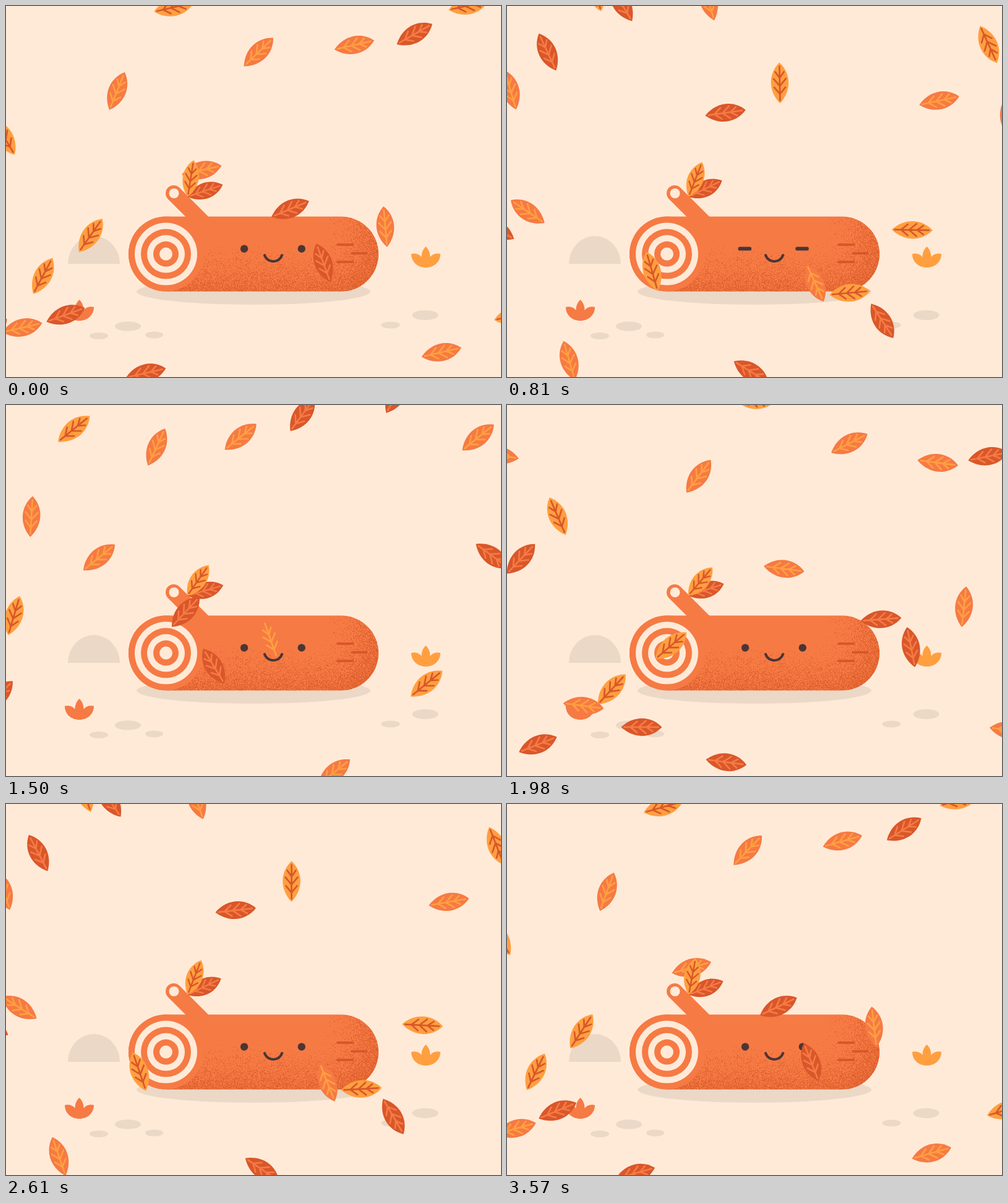
Write an HTML page with a canvas that moves like this. It is 800 px wide and 600 px high and loops after 3600 ms.

```html
<!DOCTYPE html>
<html lang="en">
<head>
<meta charset="utf-8">
<title>Autumn log</title>
<style>
  html, body { margin: 0; width: 100%; height: 100%; overflow: hidden; background: #ffead8; }
  canvas { display: block; }
</style>
</head>
<body>
<canvas id="stage" width="800" height="600"></canvas>
<script>
const LOOP = 3600, TAU = Math.PI * 2;
const CREAM = '#ffead8', SHADE = '#ebd8c6', ORANGE = '#f67a44', YELLOW = '#ff9f40', RUST = '#d9572a', INK = '#4a3634';
const stage = document.getElementById('stage').getContext('2d');

const leafShape = new Path2D('M0-33C19-15 19 13 0 33C-19 13-19-15 0-33Z');
const leafVeins = new Path2D('M0-27V28M-7-18L0-8L7-18M-10-7L0 5L10-7M-9 7L0 18L9 7');
const leafColors = { Y: [YELLOW, RUST], O: [ORANGE, YELLOW], D: [RUST, ORANGE] };

// Each leaf: colour, time at mid-path (ms), height of the bend, angle at time 0, degrees per ms
const dipping = [
  ['D', -335, 13, 60, .0885], ['O', -185, 51, 77, .097], ['O', 411, 110, 22, .069],
  ['Y', 800, 124, -31, .037], ['O', -786, -12, 77, .097], ['Y', -487, -60, 77, .097],
  ['Y', 264, -8, 77, .097], ['D', -37, 327, 67, .09], ['O', 718, 444, 77, .097],
  ['D', 938, 171, 30, .064], ['Y', -637, 413, 77, .097], ['D', 336, 576, 77, .097]
];
const arching = [
  ['O', 39, 75, 46, .079], ['O', 190, 267, 77, .097], ['O', -260, 380, -5, .053],
  ['D', -113, 423, -20, .042], ['Y', 484, 394, 35, .069], ['Y', 638, 477, 28, .07],
  ['D', 560, 531, 70, .095], ['D', 870, 592, 49.5, .089], ['O', -408, 604, 77, .097],
  ['D', -558, 11, 54, .089]
];
const gusts = [0, 1770], HALF_FLIGHT = 1200;

function ellipse(c, color, x, y, rx, ry = rx) {
  c.fillStyle = color;
  c.beginPath();
  c.ellipse(x, y, rx, ry, 0, 0, TAU);
  c.fill();
}

function line(c, color, width, x1, y1, x2, y2) {
  c.strokeStyle = color;
  c.lineWidth = width;
  c.lineCap = 'round';
  c.beginPath();
  c.moveTo(x1, y1);
  c.lineTo(x2, y2);
  c.stroke();
}

function sprout(c, color, x, y) {
  c.save();
  c.translate(x, y);
  c.fillStyle = color;
  c.fill(new Path2D('M-23.5-22C-17-24-11-22-7-17C-7-25-4-30 0-34C4-30 7-25 7-17C11-22 17-24 23.5-22C23.5-9 13 0 0 0C-13 0-23.5-9-23.5-22Z'));
  c.restore();
}

function grain(c) {
  let seed = 7;
  const random = () => (seed = seed * 16807 % 2147483647) / 2147483647;
  c.fillStyle = '#de602e';
  for (let y = 341; y < 462; y++) {
    for (let x = 259; x < 602; x++) {
      const low = Math.max(0, (y - 380) / 82), right = Math.max(0, (x - 510) / 92);
      if (random() < Math.min(.75, .65 * (low * low + right * right))) c.fillRect(x, y, 1, 1);
    }
  }
}

function makeScene() {
  const canvas = document.createElement('canvas');
  canvas.width = 800;
  canvas.height = 600;
  const c = canvas.getContext('2d');
  c.fillStyle = CREAM;
  c.fillRect(0, 0, 800, 600);

  c.fillStyle = SHADE;
  c.beginPath();
  c.ellipse(142, 417, 42, 45, 0, Math.PI, TAU);
  c.fill();
  ellipse(c, SHADE, 400, 462, 189, 21);
  ellipse(c, SHADE, 197, 518, 21, 7.7);
  ellipse(c, SHADE, 150, 533.5, 15, 5.5);
  ellipse(c, SHADE, 239.5, 532, 14.5, 5.5);
  ellipse(c, SHADE, 621.5, 516, 15, 5.5);
  ellipse(c, SHADE, 677.5, 500, 21, 8);
  sprout(c, ORANGE, 118.5, 509);
  sprout(c, YELLOW, 678.5, 423);

  line(c, ORANGE, 26, 271, 303, 325, 357);
  ellipse(c, CREAM, 271.5, 303, 8);

  c.save();
  c.beginPath();
  c.roundRect(198, 340.6, 404, 121, 60.5);
  c.fillStyle = ORANGE;
  c.fill();
  c.clip();
  grain(c);
  c.restore();
  for (let ring = 0; ring < 6; ring++) {
    ellipse(c, ring % 2 ? CREAM : ORANGE, 258.5, 401.1, 60.5 - ring * 10);
  }
  line(c, RUST, 4, 536, 386, 560, 386);
  line(c, RUST, 4, 559, 400, 582, 400);
  line(c, RUST, 4, 536, 414, 560, 414);

  c.strokeStyle = INK;
  c.lineWidth = 4;
  c.beginPath();
  c.arc(432, 398.2, 14.8, .33, Math.PI - .33);
  c.stroke();
  return canvas;
}

function drawLeaf(kind, x, y, degrees, scale = 1, lift = 0) {
  const [fill, vein] = leafColors[kind];
  stage.save();
  stage.translate(x, y);
  stage.rotate(degrees * Math.PI / 180);
  stage.translate(0, -lift);
  stage.scale(scale, scale);
  stage.fillStyle = fill;
  stage.fill(leafShape);
  stage.strokeStyle = vein;
  stage.lineWidth = 2.7;
  stage.lineCap = 'round';
  stage.stroke(leafVeins);
  stage.restore();
}

// Eased drift across the stage that slackens briefly at the bend
function driftX(u) {
  const s = Math.sin(u / HALF_FLIGHT * Math.PI / 2);
  const w = (u + 140) / 150;
  return 440 + 520 * s - 11 * s ** 3 - 11 * w * Math.exp(-w * w / 2);
}

function drawFlight(t, leaves, center, bend) {
  for (const [kind, mid, height, angle, spin] of leaves) {
    for (const gust of gusts) {
      const u = (t - gust - mid + HALF_FLIGHT + 2 * LOOP) % LOOP - HALF_FLIGHT;
      if (u > HALF_FLIGHT) continue;
      const x = driftX(u);
      const y = height + bend * ((x - center) / 520) ** 2;
      drawLeaf(kind, x, y, angle + spin * (u + mid));
    }
  }
}

function drawEyes(t) {
  const closed = t >= 750 && t < 900;
  for (const x of [385, 477.7]) {
    if (closed) {
      stage.fillStyle = INK;
      stage.beginPath();
      stage.roundRect(x - 11.5, 389.5, 21.5, 6, 2.5);
      stage.fill();
    } else {
      ellipse(stage, INK, x, 392.7, 6.2);
    }
  }
}

const scene = makeScene();

function draw(now) {
  const t = now % LOOP;
  const sway = delay => Math.sin(TAU * (t - delay) / 450);
  stage.drawImage(scene, 0, 0);
  drawEyes(t);
  drawFlight(t, arching, 375, -110);
  drawFlight(t, dipping, 410, 140);
  drawLeaf('D', 295, 308, 69.2 + 6.5 * sway(-20), .91, 28.5);
  drawLeaf('Y', 294, 307, 26.5 + 17.5 * sway(115), .91, 28.5);
  requestAnimationFrame(() => draw(performance.now()));
}
draw(0);
</script>
</body>
</html>
```
